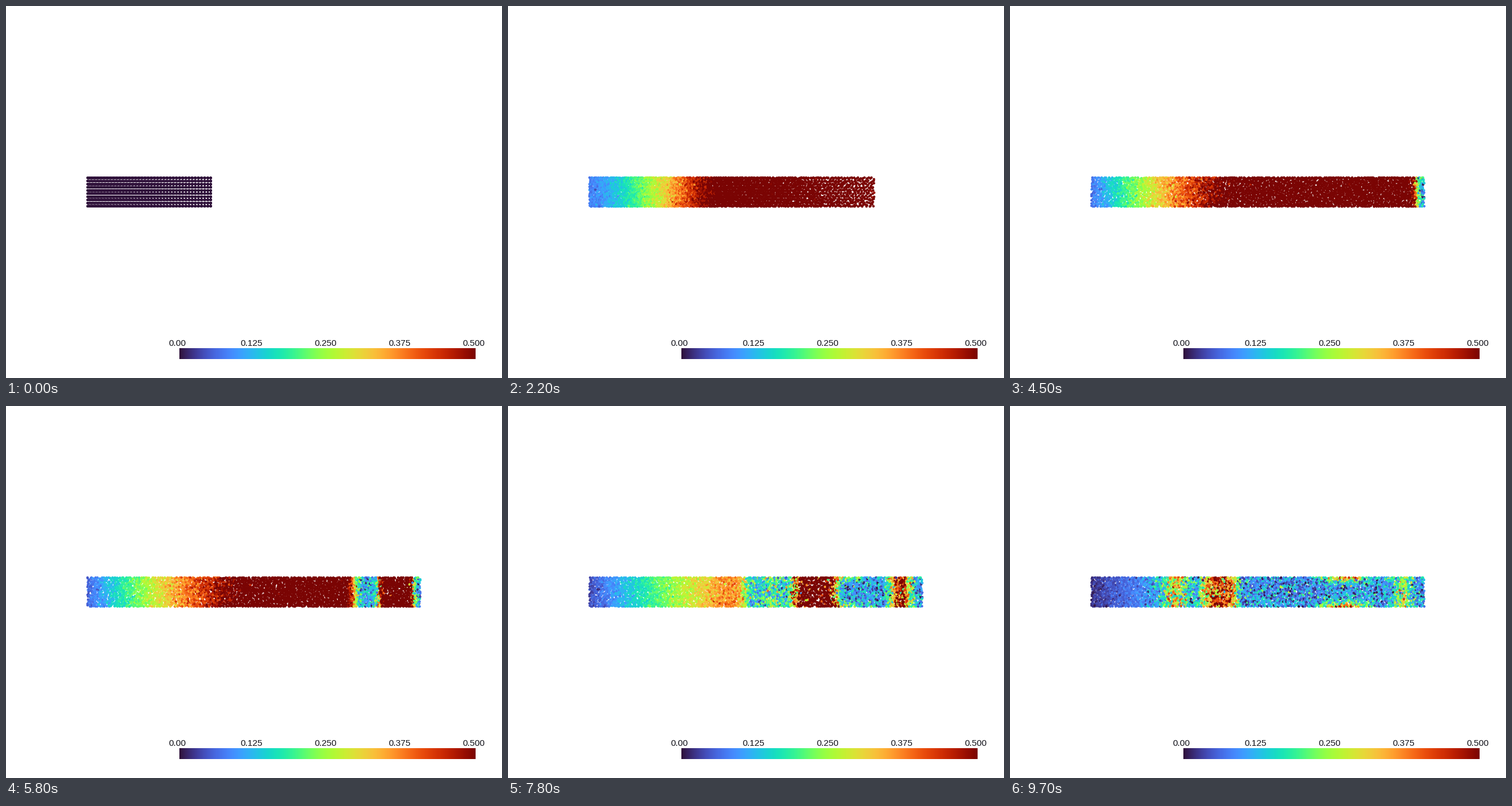
A matplotlib script that plays this animation: 864 px wide and 648 px high, repeating every 9.8 s.

```python
import numpy as np
import matplotlib
matplotlib.rcParams["toolbar"] = "None"
import matplotlib.pyplot as plt
from matplotlib.animation import FuncAnimation

W, H = 864, 648
FRAMES, STEP = 98, 100
COLS, ROWS, LAYERS = 40, 10, 11
LEFT, RIGHT, DAM = 142.0, 721.6, 356.5
TOP, PITCH = 299.3, 5.5
VMAX = 0.5

rng = np.random.default_rng(7)
cmap = plt.get_cmap("turbo")


def smooth(t, a, b):
    s = np.clip((t - a) / (b - a), 0, 1)
    return s * s * (3 - 2 * s)


def path(t, *points):
    """Value at time t along a few (time, value) points."""
    return np.interp(t, *zip(*points))


def hump(x, centre, width, power=2):
    return np.exp(-np.abs((x - centre) / width) ** power)


# ---- particles: slices along x, each holding one dot per row ----
SLICES = COLS * LAYERS
N = SLICES * ROWS
s, row = (a.ravel() for a in np.mgrid[0:SLICES, 0:ROWS])
col, layer = s // LAYERS, s % LAYERS
depth = 1 - 0.015 * layer / (LAYERS - 1)
grid_x = W / 2 + (LEFT + PITCH * col - W / 2) * depth
grid_y = H / 2 + (TOP + PITCH * row - H / 2) * depth
grid_q = (grid_x - LEFT) / (DAM - LEFT)
u = (s + 0.5) / SLICES
phase = rng.random(ROWS)[row]
loose_y = 297.6 + 5.28 * (row + (s * 0.618034 + phase) % 1)
jit_x, jit_y, n1, n2 = rng.normal(size=(4, N))
swing, rank = rng.random((2, N))


def place(t):
    front = DAM + 144.5 * (t - 0.25 * (1 - np.exp(-t / 0.25)))
    end = min(front, RIGHT)
    thin = path(t, (0, .1), (1.3, .3), (3, .1), (4.5, 0))
    slosh = path(t, (2.8, 0), (6, .035), (9.7, -.01))
    g = (1 - thin) * u + thin * u ** 8 + slosh * np.sin(np.pi * u)
    mix = smooth(t, 0.7, 3.0)
    wave = 2.1 * t + 2 * np.pi * swing
    x = LEFT + (end - LEFT) * (grid_q + (g - grid_q) * smooth(t, 0, 0.9))
    x = x + mix * (0.7 * jit_x + np.sin(wave))
    y = grid_y + (loose_y - grid_y) * mix
    y = y + mix * (0.6 * jit_y + 0.5 * np.cos(wave))
    return np.clip(x, LEFT, end), np.clip(y, 298.9, 349.2)


# ---- speed: outflow on the left, a returning bore and its wake ----
def jet(x, t):
    centre = path(t, (4.5, 715), (7, 648), (8.6, 420), (9.7, 365))
    return hump(x, centre, 1 + 42 * smooth(t, 4, 7) - 12 * smooth(t, 7, 8.6), 4)


def outflow(x, t):
    late = max(0, (t - 3) / 6.7)
    slope = 0.0021 - 0.0014 * late ** 2
    bend = 2 - smooth(t, 1.3, 3)
    d = np.maximum(x - 140, 0) / 205
    return np.minimum(0.08 - 0.06 * late + slope * 205 * d ** bend, 0.6)


def wake(x, y, t, bore):
    side = np.abs(y - H / 2) / 25
    v = 0.09 + 0 * x
    v += jet(x, t) * path(t, (4.5, 0), (5.5, .9), (7, .9), (8.6, .36), (9.7, .33))
    v += 0.2 * smooth(t, 7, 8.6) * hump(x, bore + 47, 24)
    v += (0.4 * smooth(t, 5, 7) - 0.25 * smooth(t, 8.6, 9.7)) * hump(x, 684, 18)
    v += 0.32 * smooth(t, 7, 8.6) * hump(x, 585, 34) * side ** 3
    return v


def speed(x, y, t):
    bore = path(t, (2.5, 760), (3, 718), (4.5, 708), (7, 513), (8.6, 313), (9.7, 242))
    width = 2 + 1.2 * max(0, t - 2.8)
    past = 0.5 + 0.5 * np.tanh((x - bore) / (2 * width))
    v = outflow(x, t) * (1 - past) + wake(x, y, t, bore) * past
    noise = 0.07 * n1 * v + n2 * (0.012 + past * (0.025 + 0.2 * v))
    return np.abs(v + noise) * min(1, t / 1.3)


def spray_gap(x, t):
    """Share of dots missing where the splash falls back."""
    return 0.55 * hump(t, 6.9, 0.8) * jet(x, t)


# ---- stage ----
fig = plt.figure(figsize=(W / 72, H / 72), dpi=72, facecolor="white")
ax = fig.add_axes([0, 0, 1, 1])
ax.imshow(np.linspace(0, 1, 256)[None, :], cmap=cmap, aspect="auto",
          extent=(302, 817.5, 615, 596), interpolation="nearest")
ax.set_xlim(0, W)
ax.set_ylim(H, 0)
ax.axis("off")
for i, label in enumerate(["0.00", "0.125", "0.250", "0.375", "0.500"]):
    ax.text(298.5 + 129.1 * i, 591.5, label, family="Liberation Sans",
            size=15.4, color="#101018", ha="center", va="baseline")
dots = ax.scatter(grid_x, grid_y, s=19, linewidths=0)


def draw(frame):
    t = frame * STEP / 1000
    x, y = place(t)
    dots.set_facecolors(cmap(np.clip(speed(x, y, t) / VMAX, 0, 1)))
    shown = np.where(rank < spray_gap(x, t), np.nan, x)
    dots.set_offsets(np.ma.masked_invalid(np.c_[shown, y]))
    return dots,


anim = FuncAnimation(fig, draw, frames=FRAMES, interval=STEP,
                     init_func=lambda: draw(0), repeat=True, repeat_delay=0)
plt.show()
```
